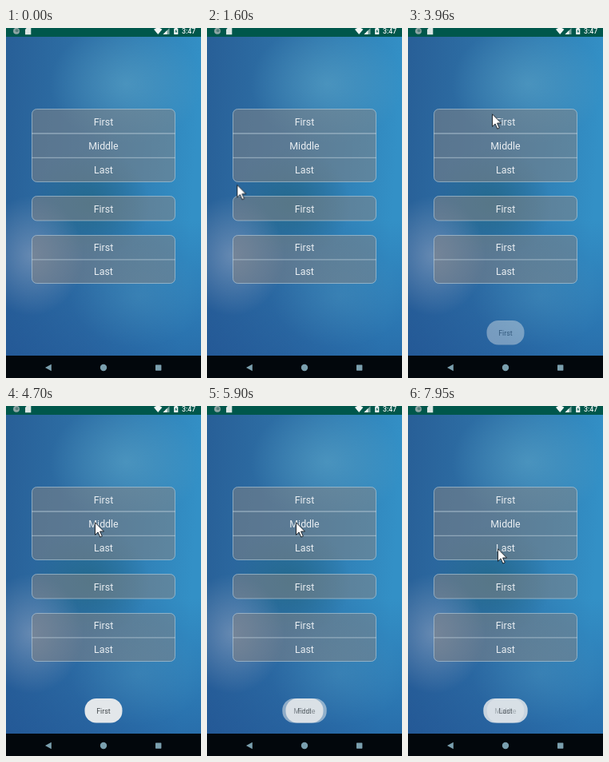
Recreate the animation shown at these times as an HTML page. Size 244x438 px, loop 8000 ms.

```html
<!DOCTYPE html>
<html lang="en">
<head>
<meta charset="utf-8">
<title>Button groups with toasts</title>
<style>
html, body { margin: 0; width: 100%; height: 100%; overflow: hidden; background: #2b6ea8; }
svg { display: block; width: 244px; height: 438px; font-family: Roboto, sans-serif; }

.label { font-size: 12.4px; fill: #e9eef2; text-anchor: middle; }
.panel { fill: rgba(133, 130, 130, .52); stroke: rgba(190, 208, 218, .6); }
.rule { stroke: rgba(190, 208, 218, .55); stroke-width: 1.3; }
.toast { opacity: 0; }
.toast rect { fill: #e3e7ea; }
.toast text { font-size: 8.9px; fill: #444a4e; text-anchor: middle; }

.cursor, .ring, .press, .toast { animation: 8s linear infinite; }
.cursor { animation-name: move; }
.ring { animation-name: click; animation-timing-function: step-end; }
.press { animation-name: press; animation-timing-function: step-end; }
.first { animation-name: first; }
.middle { animation-name: middle; }
.last { animation-name: last; }

@keyframes move {
  0%, 5.9% { transform: translate(146px, 450px); }
  6% { transform: translate(133px, 428px); }
  7.25%, 11.4% { transform: translate(92px, 379px); }
  13% { transform: translate(66px, 353px); }
  14.5% { transform: translate(31px, 318px); }
  16.2% { transform: translate(10px, 280px); }
  17.2% { transform: translate(6px, 255px); }
  18.6% { transform: translate(17px, 225px); }
  20% { transform: translate(37px, 196px); }
  21.6%, 22% { transform: translate(73px, 140px); }
  24.1%, 48% { transform: translate(104px, 105px); }
  49.5% { transform: translate(105px, 107px); }
  54% { transform: translate(107px, 118px); }
  58.1% { transform: translate(111px, 146px); }
  58.7%, 75% { transform: translate(111px, 145px); }
  77.25% { transform: translate(111px, 171px); }
  79.75%, 100% { transform: translate(112px, 178px); }
}
@keyframes click {
  0%, 35.125%, 64.75%, 88.5%, 100% { opacity: 0; }
  33.875%, 62.875%, 86.625% { opacity: 1; }
}
@keyframes press {
  0%, 46.625%, 69.5%, 94.25%, 100% { opacity: 0; }
  45.625% { opacity: 1; transform: none; }
  67.625% { opacity: 1; transform: translateY(30.5px); }
  92.375% { opacity: 1; transform: translateY(61px); }
}
@keyframes first {
  0% { opacity: 0; }
  48% { opacity: 0; animation-timing-function: cubic-bezier(.5, 1, .89, 1); }
  54.25% { opacity: 1; }
  71.7% { opacity: 1; animation-timing-function: cubic-bezier(.11, 0, .5, 0); }
  77.95%, 100% { opacity: 0; }
}
@keyframes middle {
  0% { opacity: 0; }
  71.7% { opacity: 0; animation-timing-function: cubic-bezier(.5, 1, .89, 1); }
  77.95%, 96.95% { opacity: 1; }
  98.2% { opacity: .96; }
  99.4% { opacity: .85; }
  100% { opacity: .76; }
}
@keyframes last {
  0%, 96.95% { opacity: 0; }
  98.2% { opacity: .36; }
  99.4% { opacity: .63; }
  100% { opacity: .74; }
}
</style>
</head>
<body>
<svg viewBox="0 0 244 438">
  <defs>
    <linearGradient id="sky" x1="0" y1="0" x2="1" y2=".12">
      <stop offset="0" stop-color="#285f97"/>
      <stop offset=".5" stop-color="#2f74aa"/>
      <stop offset="1" stop-color="#3390c6"/>
    </linearGradient>
    <linearGradient id="dusk" x1="0" y1="0" x2="0" y2="1">
      <stop offset=".55" stop-color="#1f4f92" stop-opacity="0"/>
      <stop offset="1" stop-color="#1f4f92" stop-opacity=".6"/>
    </linearGradient>
    <radialGradient id="haze">
      <stop offset="0" stop-color="#8ea2c0" stop-opacity=".6"/>
      <stop offset="1" stop-color="#8ea2c0" stop-opacity="0"/>
    </radialGradient>
    <radialGradient id="glow">
      <stop offset="0" stop-color="#5ba3c6" stop-opacity=".6"/>
      <stop offset="1" stop-color="#5ba3c6" stop-opacity="0"/>
    </radialGradient>
    <radialGradient id="teal">
      <stop offset="0" stop-color="#1f647e" stop-opacity=".65"/>
      <stop offset="1" stop-color="#1f647e" stop-opacity="0"/>
    </radialGradient>
    <clipPath id="round"><rect x="32" y="101.5" width="180" height="91" rx="6"/></clipPath>
  </defs>

  <!-- Wallpaper -->
  <rect width="244" height="438" fill="url(#sky)"/>
  <rect width="244" height="438" fill="url(#dusk)"/>
  <ellipse cx="150" cy="70" rx="95" ry="75" fill="url(#glow)"/>
  <ellipse cx="105" cy="220" rx="75" ry="70" fill="url(#teal)"/>
  <ellipse cx="32" cy="285" rx="65" ry="75" fill="url(#haze)"/>
  <ellipse cx="165" cy="335" rx="85" ry="65" fill="url(#glow)" opacity=".45"/>

  <!-- Status bar -->
  <rect width="244" height="11" fill="#00574b"/>
  <circle cx="13" cy="3.8" r="4" fill="#8fa6a5"/>
  <circle cx="13.6" cy="3.3" r="2" fill="#587f7c"/>
  <path d="M26-.5h5.3v8.7h-7.3V2z" fill="#dce6e4"/>
  <path d="M185 1.7q5.2-4 10.4 0L190.2 8z" fill="#f2f6f5"/>
  <path d="M204.500 0v8h-8z" fill="#7ca59f"/>
  <path d="M201.500 3v5h-5z" fill="#f2f6f5"/>
  <path d="M211.500-.5h2.500v1h1.300v7.600h-5.100V.5h1.300z" fill="#f2f6f5"/>
  <path d="M213.200 1.500l-1.800 3h1.200v2.200l1.700-3h-1.100z" fill="#00574b"/>
  <text x="220" y="7.300" font-size="8.800" font-weight="500" fill="#f2f6f5">3:47</text>

  <!-- Button groups -->
  <g class="panel">
    <rect x="32.500" y="101.500" width="179" height="91" rx="6"/>
    <rect x="32.500" y="210.500" width="179" height="30.500" rx="6"/>
    <rect x="32.500" y="259.500" width="179" height="60" rx="6"/>
  </g>
  <path class="rule" d="M32 132h180M32 162.300h180M32 289.800h180"/>
  <g clip-path="url(#round)">
    <rect class="press" x="32" y="101.500" width="180" height="30.500" fill="#fff" fill-opacity=".2"/>
  </g>
  <g class="label">
    <text x="122" y="122">First</text>
    <text x="122" y="152">Middle</text>
    <text x="122" y="182.300">Last</text>
    <text x="122" y="230.800">First</text>
    <text x="122" y="279">First</text>
    <text x="122" y="309.300">Last</text>
  </g>

  <!-- Toasts -->
  <g class="toast first">
    <rect x="98.500" y="366" width="47" height="30.500" rx="14.500"/>
    <text x="122" y="384.500">First</text>
  </g>
  <g class="toast middle">
    <rect x="94.300" y="366" width="55.400" height="30.500" rx="14.500"/>
    <text x="122" y="384.500">Middle</text>
  </g>
  <g class="toast last">
    <rect x="98.700" y="366" width="46.600" height="30.500" rx="14.500"/>
    <text x="122" y="384.500">Last</text>
  </g>

  <!-- Navigation bar -->
  <rect y="410" width="244" height="28" fill="#02070c"/>
  <g fill="#7a9fae">
    <path d="M56.800 420.700v8.600l-7.800-4.300z"/>
    <circle cx="122" cy="425" r="4.200"/>
    <rect x="187" y="421.500" width="7.400" height="7.200" rx=".6"/>
  </g>

  <!-- Pointer -->
  <g class="cursor">
    <g class="ring" fill="none">
      <circle cx=".5" cy=".5" r="10.500" stroke="#111"/>
      <circle cx=".5" cy=".5" r="9.500" stroke="#fff"/>
    </g>
    <path d="M.5.800V16.300l3.600-3.400 2.700 6.200 2.500-1.100-2.700-6h4.900z" fill="#fff" stroke="#10161c" stroke-width=".9"/>
  </g>
</svg>
</body>
</html>
```
